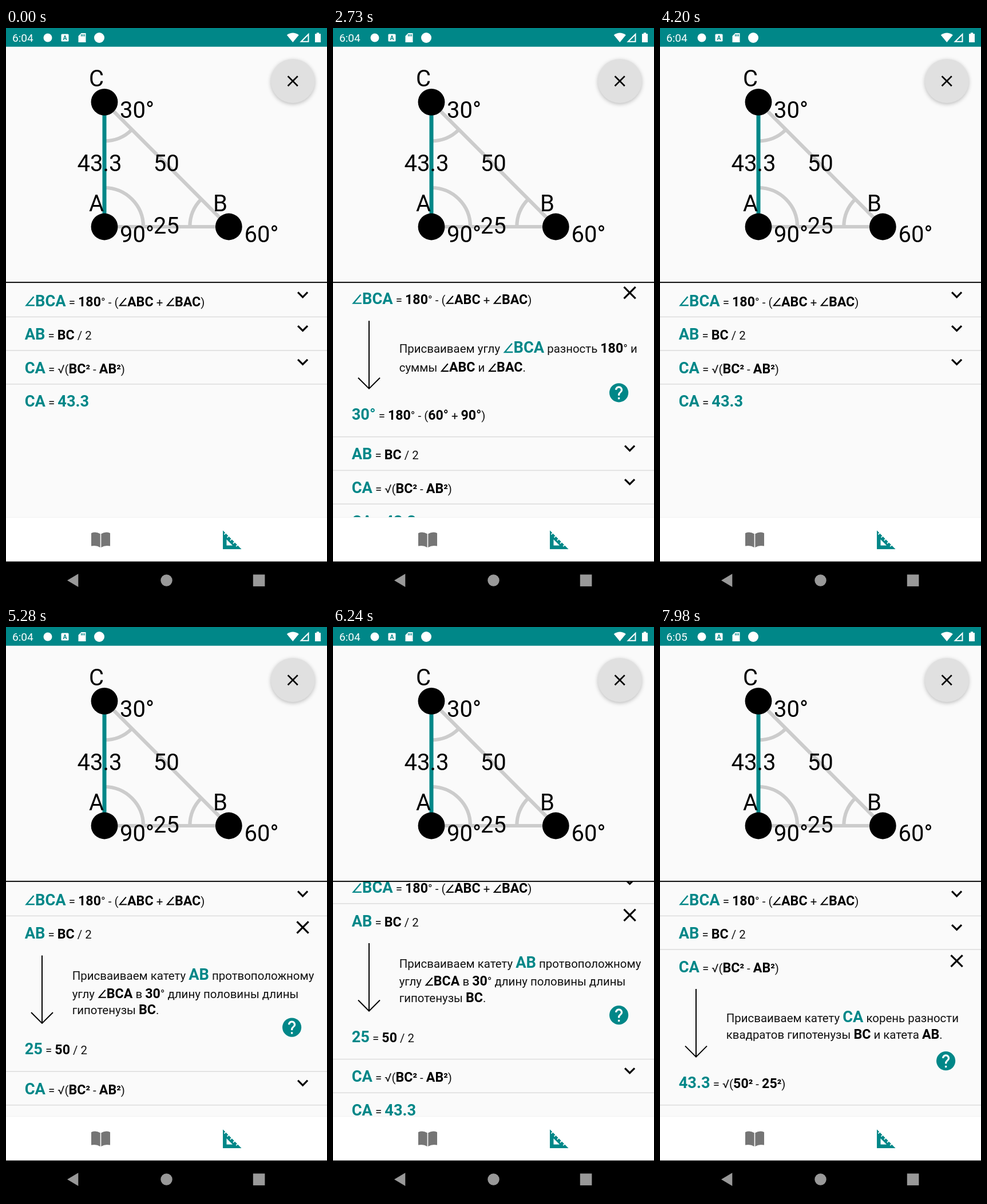
Animation, 561 px wide and 997 px high, one loop 8000 ms. Source, as an HTML page with a canvas:

```html
<!DOCTYPE html>
<html lang="ru">
<head>
<meta charset="utf-8">
<style>
  html, body { margin: 0; width: 100%; height: 100%; overflow: hidden; background: #fafafa; }
  canvas { display: block; width: 561px; height: 997px; }
</style>
</head>
<body>
<canvas id="stage" width="561" height="997"></canvas>
<script>
const ctx = document.getElementById('stage').getContext('2d');
const W = 561, H = 997, LOOP = 8000;
const TEAL = '#008788', BG = '#fafafa', GREY = '#cccccc';
const LIST_TOP = 445, LIST_BOTTOM = 855, ROW = 58.65, OPEN_ROW = 271.6;

const STYLES = {
  big: { size: 27.27, weight: 700, color: TEAL },
  bold: { size: 23.18, weight: 700, color: '#000' },
  sup: { size: 20.45, weight: 700, color: '#000' },
  plain: { size: 20.45, weight: 400, color: '#111' }
};

// Markup: {big} *bold* ~superscript~ plain
const STEPS = [
  {
    head: '{∠BCA} = *180*° - (*∠ABC* + *∠BAC*)',
    note: [[125, 'Присваиваем углу {∠BCA} разность *180*° и'],
           [158, 'суммы *∠ABC* и *∠BAC*.']],
    result: '{30°} = *180*° - (*60°* + *90°*)'
  },
  {
    head: '{AB} = *BC* / 2',
    note: [[112, 'Присваиваем катету {AB} протвоположному'],
           [143.3, 'углу *∠BCA* в *30*° длину половины длины'],
           [172, 'гипотенузы *BC*.']],
    result: '{25} = *50* / 2'
  },
  {
    head: '{CA} = √(*BC*~²~ - *AB*~²~)',
    note: [[127, 'Присваиваем катету {CA} корень разности'],
           [156, 'квадратов гипотенузы *BC* и катета *AB*.']],
    result: '{43.3} = √(*50*~²~ - *25*~²~)'
  },
  { head: '{CA} = {43.3}' }
];

const CLOSE = new Path2D('M19 6.41 17.59 5 12 10.59 6.41 5 5 6.41 10.59 12 5 17.59 6.41 19 12 13.41 17.59 19 19 17.59 13.41 12Z');
const CHEVRON = new Path2D('M16.59 8.59 12 13.17 7.41 8.59 6 10l6 6 6-6z');
const QUESTION = new Path2D('M13 19h-2v-2h2v2zm2.07-7.75-.9.92C13.45 12.9 13 13.5 13 15h-2v-.5c0-1.1.45-2.1 1.17-2.83l1.24-1.26c.37-.36.59-.86.59-1.41 0-1.1-.9-2-2-2s-2 .9-2 2H8c0-2.21 1.79-4 4-4s4 1.79 4 4c0 .88-.36 1.68-.93 2.25z');
const BOOK_PAGE = new Path2D('M149 882Q157 878.5 164.7 883.2V907Q158 902.6 149 904.6Z');

function tween(t, keys) {
  if (t <= keys[0][0]) return keys[0][1];
  for (let i = 1; i < keys.length; i++) {
    const [t0, v0] = keys[i - 1], [t1, v1] = keys[i];
    if (t < t1) return v0 + (v1 - v0) * (t - t0) / (t1 - t0);
  }
  return keys[keys.length - 1][1];
}

function stateAt(t) {
  const state = { open: -1, scroll: 0, glow: 0, clock: t < 7500 ? '6:04' : '6:05' };
  if (t >= 1860 && t < 4200) {
    state.open = 0;
    state.scroll = tween(t, [[2700, 0], [2760, 7], [2820, 22], [2880, 37.5]]);
    state.glow = tween(t, [[2880, 0], [2970, 1], [3090, 1], [3300, 0]]);
  } else if (t >= 5280 && t < 6930) {
    state.open = 1;
    state.scroll = tween(t, [[6030, 0], [6060, 2.9], [6240, 21.4], [6330, 24.4], [6500, 25.5]]);
  } else if (t >= 7500) {
    state.open = 2;
  }
  return state;
}

function fillRect(x, y, w, h, color) {
  ctx.fillStyle = color;
  ctx.fillRect(x, y, w, h);
}

function disc(x, y, r, color) {
  ctx.fillStyle = color;
  ctx.beginPath();
  ctx.arc(x, y, r, 0, Math.PI * 2);
  ctx.fill();
}

function trace(points) {
  ctx.beginPath();
  points.forEach(([x, y]) => ctx.lineTo(x, y));
}

function polygon(points, color) {
  trace(points);
  ctx.fillStyle = color;
  ctx.fill();
}

function polyline(points, color, width) {
  trace(points);
  ctx.strokeStyle = color;
  ctx.lineWidth = width;
  ctx.stroke();
}

function icon(path, x, y, scale, color) {
  ctx.save();
  ctx.translate(x, y);
  ctx.scale(scale, scale);
  ctx.translate(-12, -12);
  ctx.fillStyle = color;
  ctx.fill(path);
  ctx.restore();
}

function text(str, x, y, size, weight, color) {
  ctx.font = `${weight} ${size}px Roboto, sans-serif`;
  ctx.fillStyle = color;
  ctx.fillText(str, x, y);
  return ctx.measureText(str).width;
}

function angleSign(x, y, size, color) {
  const at = (u, v) => [x + u * size, y - v * size];
  polyline([at(.58, .6), at(.11, .045), at(.63, .045)], color, size * .088);
  return size * .675;
}

function richText(markup, x, y) {
  const kinds = { '{': 'big', '*': 'bold', '~': 'sup' };
  for (const part of markup.match(/\{[^}]+\}|\*[^*]+\*|~[^~]+~|[^{*~]+/g)) {
    const kind = kinds[part[0]];
    const { size, weight, color } = STYLES[kind || 'plain'];
    let run = kind ? part.slice(1, -1) : part;
    if (run[0] === '∠') {
      x += angleSign(x, y, size, color);
      run = run.slice(1);
    }
    x += text(run, x, y, size, weight, color);
  }
}

function drawStatusBar(clock) {
  fillRect(0, 0, W, 32.7, TEAL);
  text(clock, 10.9, 23.6, 19.1, 400, '#fff');
  disc(73, 17, 7.5, '#fff');
  ctx.fillStyle = '#fff';
  ctx.beginPath();
  ctx.roundRect(96.5, 10.5, 13, 13, 1.5);
  ctx.fill();
  text('A', 99.6, 20.8, 10.5, 700, TEAL);
  polygon([[131.5, 9], [139.5, 9], [139.5, 25], [126.5, 25], [126.5, 14]], '#fff');
  for (const x of [131, 133.7, 136.4]) fillRect(x, 11, 1.4, 3.6, TEAL);
  disc(163, 17, 9, '#fff');

  ctx.fillStyle = '#fff';
  ctx.beginPath();
  ctx.moveTo(501.3, 25);
  ctx.lineTo(490.8, 12.3);
  ctx.quadraticCurveTo(501.3, 4.8, 511.8, 12.3);
  ctx.fill();
  polygon([[529.5, 8.5], [529.5, 24.8], [513.3, 24.8]], '#fff');
  polygon([[527.5, 13.5], [527.5, 22.8], [518.3, 22.8]], TEAL);
  fillRect(540, 10.2, 10, 14.8, '#fff');
  fillRect(542.8, 8.2, 4.4, 3, '#fff');
}

function drawDiagram() {
  const A = [172, 347], B = [389.3, 347], C = [172, 129.3];
  polyline([A, B, C], GREY, 6.2);
  const arcs = [[A, -Math.PI / 2, 0], [B, Math.PI, Math.PI * 1.25], [C, Math.PI / 4, Math.PI / 2]];
  for (const [[x, y], from, to] of arcs) {
    ctx.beginPath();
    ctx.arc(x, y, 68, from, to);
    ctx.stroke();
  }
  polyline([C, A], TEAL, 7);
  for (const [x, y] of [A, B, C]) disc(x, y, 23.4, '#000');

  const labels = [
    ['C', 145, 102], ['A', 145, 320], ['B', 362, 320],
    ['30°', 199, 157], ['90°', 199, 374.3], ['60°', 416.5, 374.3],
    ['43.3', 124.5, 250.3], ['50', 257.7, 250.3], ['25', 257.7, 359]
  ];
  for (const [str, x, y] of labels) text(str, x, y, 40, 400, '#000');

  ctx.save();
  ctx.shadowColor = 'rgba(0,0,0,.25)';
  ctx.shadowBlur = 7;
  ctx.shadowOffsetY = 2;
  disc(501.3, 92.6, 38.4, '#e0e0e0');
  ctx.restore();
  icon(CLOSE, 501.2, 92.7, 1.3636, '#000');
}

function drawDetail(step, top) {
  polyline([[63, top + 69], [63, top + 187]], '#000', 2);
  polyline([[44, top + 168.5], [63, top + 187.5], [82, top + 168.5]], '#000', 2);
  for (const [dy, line] of step.note) richText(line, 115.7, top + dy);
  disc(499.6, top + 194.6, 16.6, TEAL);
  icon(QUESTION, 499.6, top + 194.6, 1.64, '#fff');
  richText(step.result, 32.7, top + 242);
}

function drawGlow(amount) {
  if (!amount) return;
  const rise = 47 * amount, ry = 530 * amount;
  ctx.globalAlpha = .13 * Math.min(1, amount * 1.4);
  ctx.fillStyle = TEAL;
  ctx.beginPath();
  ctx.ellipse(W / 2, LIST_BOTTOM - rise + ry, 841, ry, 0, 0, Math.PI * 2);
  ctx.fill();
  ctx.globalAlpha = 1;
}

function drawList({ open, scroll, glow }) {
  ctx.save();
  ctx.beginPath();
  ctx.rect(0, LIST_TOP, W, LIST_BOTTOM - LIST_TOP);
  ctx.clip();
  let top = 445.8 - scroll;
  STEPS.forEach((step, i) => {
    richText(step.head, 32.7, top + 39.7);
    if (step.result) {
      const isOpen = i === open;
      icon(isOpen ? CLOSE : CHEVRON, 518.6, top + 20, 1.6, '#000');
      if (isOpen) drawDetail(step, top);
      top += isOpen ? OPEN_ROW : ROW;
      fillRect(0, top - .8, W, 1.6, '#dedede');
    }
  });
  drawGlow(glow);
  ctx.restore();
  fillRect(0, 443.2, W, 1.9, '#000');
}

function drawBottomBars() {
  fillRect(0, 854, W, 1, '#f2f2f2');
  fillRect(0, LIST_BOTTOM, W, 77, '#fff');

  ctx.fillStyle = '#757575';
  ctx.fill(BOOK_PAGE);
  ctx.save();
  ctx.translate(331, 0);
  ctx.scale(-1, 1);
  ctx.fill(BOOK_PAGE);
  ctx.restore();

  polygon([[379, 877.3], [379, 910], [411.5, 910]], TEAL);
  polygon([[385.5, 893], [385.5, 903.5], [396, 903.5]], '#fff');
  for (let i = 0; i < 5; i++) {
    const x = 383.8 + i * 5.2, y = 882 + i * 5.2;
    polyline([[x + .8, y - .8], [x - 2.4, y + 2.4]], '#fff', 1.8);
  }

  fillRect(0, 931.5, W, H - 931.5, '#000');
  polygon([[107, 964.5], [126.3, 953], [126.3, 976]], '#999');
  disc(280.5, 964.5, 10.2, '#999');
  fillRect(431.8, 954.3, 20.6, 20.6, '#999');
}

function frame() {
  const state = stateAt(performance.now() % LOOP);
  fillRect(0, 0, W, H, BG);
  drawDiagram();
  drawList(state);
  drawBottomBars();
  drawStatusBar(state.clock);
  requestAnimationFrame(frame);
}
frame();
</script>
</body>
</html>
```
